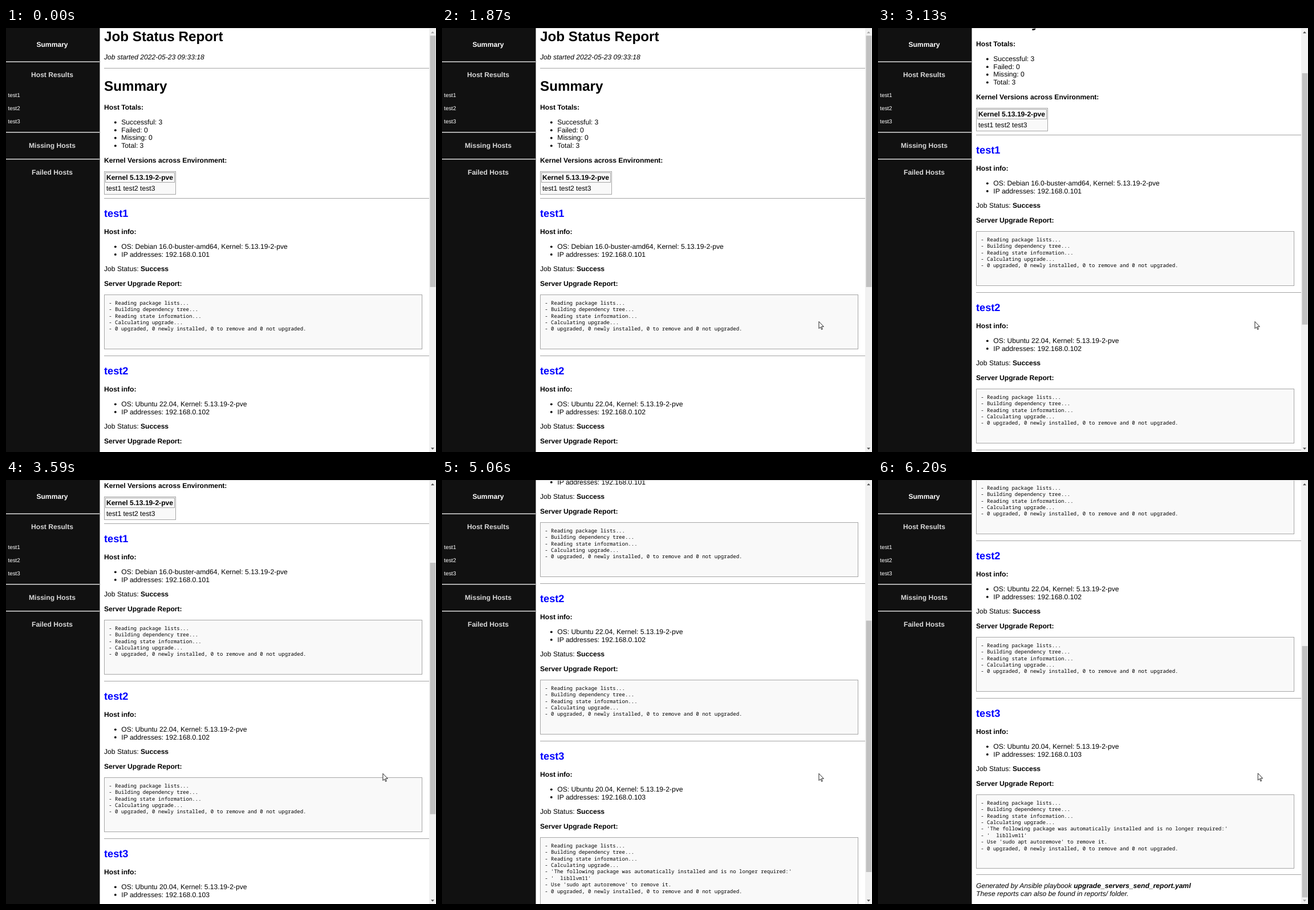
An HTML page for the animation above (8000 ms loop, 754 px wide and 743 px high).

```html
<!DOCTYPE html>
<html lang="en">
<head>
<meta charset="utf-8">
<title>Job Status Report</title>
<style>
  html, body { margin: 0; width: 100%; height: 100%; overflow: hidden; background: #fff; }
  svg { display: block; width: 100vw; height: 100vh; }
  text { font: 12.11px "Liberation Sans", Arial, sans-serif; text-rendering: geometricPrecision; white-space: pre; }
  .b { font-weight: bold; }
  .i { font-style: italic; }
  .h1 { font-size: 24.22px; font-weight: bold; }
  .h2 { font-size: 18.17px; font-weight: bold; fill: #00f; }
  .log { font: 9.02px "Noto Sans Mono", "DejaVu Sans Mono", monospace; }
  .nav { font-weight: bold; text-anchor: middle; fill: #d8d8d8; }
  .active, .link { fill: #fff; }
  .link { font-size: 9.84px; }
  .box { fill: #f9f9f9; stroke: #a6a6a6; }
</style>
</head>
<body>
<svg viewBox="0 0 754 743">
  <g id="page"></g>
  <rect x="164" width="590" height="1" fill="#d4d4d4"/>
  <g id="sidebar"></g>
  <rect x="742" y="1" width="12" height="742" fill="#f1f1f1"/>
  <rect id="thumb" x="743.5" width="9.8" height="440.5" fill="#c1c1c1"/>
  <path id="up" d="M745 9.3h6l-3-3.3z"/>
  <path id="down" d="M745 735.5h6l-3 3.3z"/>
  <path id="cursor" d="M.4.4V12.6L3.2 10 5.1 14.4 6.8 13.7 4.9 9.3H8.8Z" fill="#fff" stroke="#000" stroke-width=".85"/>
</svg>
<script>
const $ = id => document.getElementById(id);
const LEFT = 172, LINE = 13.63, PARAGRAPH = 25.8, LOG_LINE = 11.36, SECTION = 275.8;

const text = (cls, x, y, content) => `<text class="${cls}" x="${x}" y="${y}">${content}</text>`;
const rule = y => `<rect x="${LEFT}" y="${y}" width="570" height="1" fill="#a4a4a4"/>`;
const box = (x, y, w, h) => `<rect class="box" x="${x + .5}" y="${y + .5}" width="${w}" height="${h}"/>`;
const bold = content => `<tspan class="b">${content}</tspan>`;
const list = (y, items) => items.map((item, i) =>
  `<circle cx="191.8" cy="${y + i * LINE - 3.7}" r="1.9"/>` + text('', 202.3, y + i * LINE, item)).join('');

const steps = ['Reading package lists...', 'Building dependency tree...',
  'Reading state information...', 'Calculating upgrade...'];
const totals = '0 upgraded, 0 newly installed, 0 to remove and 0 not upgraded.';
const cleanup = ["'The following package was automatically installed and is no longer required:'",
  "'  libllvm11'", "Use 'sudo apt autoremove' to remove it."];
const hosts = [
  { os: 'Debian 16.0-buster-amd64', log: [...steps, totals] },
  { os: 'Ubuntu 22.04', log: [...steps, totals] },
  { os: 'Ubuntu 20.04', log: [...steps, ...cleanup, totals] },
];

function hostSection({ os, log }, i) {
  const top = Math.round(298 + SECTION * i);
  const info = top + 63.2;
  const status = info + PARAGRAPH * 2 + LINE;
  return rule(top) +
    text('h2', LEFT, top + 33, `test${i + 1}`) +
    text('b', LEFT, info, 'Host info:') +
    list(info + PARAGRAPH, [`OS: ${os}, Kernel: 5.13.19-2-pve`, `IP addresses: 192.168.0.10${i + 1}`]) +
    text('', LEFT, status, `Job Status: ${bold('Success')}`) +
    text('b', LEFT, status + PARAGRAPH, 'Server Upgrade Report:') +
    box(LEFT, top + 169, 557, Math.floor((log.length + 2) * LOG_LINE + 16)) +
    log.map((line, n) => text('log', 180.3, top + 187 + n * LOG_LINE, `- ${line}`)).join('');
}

$('page').innerHTML =
  text('h1', LEFT, 22.6, 'Job Status Report') +
  text('i', LEFT, 55.3, 'Job started 2022-05-23 09:33:18') +
  rule(70) +
  text('h1', LEFT, 110.4, 'Summary') +
  text('b', LEFT, 143.4, 'Host Totals:') +
  list(143.4 + PARAGRAPH, ['Successful: 3', 'Failed: 0', 'Missing: 0', 'Total: 3']) +
  text('b', LEFT, 235.8, 'Kernel Versions across Environment:') +
  box(LEFT, 251, 125, 40) + box(LEFT + 2, 253, 121, 17) +
  text('b', 175.9, 266.1, 'Kernel 5.13.19-2-pve') +
  text('', 175.9, 285, 'test1 test2 test3') +
  hosts.map(hostSection).join('') +
  rule(1159) +
  text('i', LEFT, 1183.2, `Generated by Ansible playbook ${bold('upgrade_servers_send_report.yaml')}`) +
  text('i', LEFT, 1183.2 + LINE, 'These reports can also be found in reports/ folder.');

const divider = y => `<rect y="${y}" width="164" height="1.5" fill="#ddd"/>`;
$('sidebar').innerHTML =
  '<rect width="164.5" height="743" fill="#111"/>' +
  text('nav active', 81, 33.4, 'Summary') + divider(58.5) +
  text('nav', 81, 86.4, 'Host Results') +
  hosts.map((host, i) => text('link', 3.5, 120.5 + 23.4 * i, `test${i + 1}`)).join('') + divider(182) +
  text('nav', 81, 209.8, 'Missing Hosts') + divider(229) +
  text('nav', 81, 256.8, 'Failed Hosts');

// Motion is sampled 15 times a second; all times below count samples.
const LOOP = 8000, SAMPLE = 1000 / 15, SAMPLE_OFFSET = 18;
const NOTCH = 111, NOTCH_TIME = 3, MAX_SCROLL = 468;
const wheelTurns = [43.3, 51.3, 65.04, 75.32, 82.16];

// Mouse moves: start, duration, dx, dy
const entry = { time: 17, x: 719, y: 737 };
const moves = [[17, 1, 21, -4], [22, 6, -79.5, -219], [83, 5, 3.5, -.5], [90, 3, 1.8, 0]];

const progress = (n, start, duration) => Math.min(1, Math.max(0, (n - start) / duration));
const easeOut = (u, power) => 1 - (1 - u) ** power;

function scrollAt(n) {
  return wheelTurns.reduce((scroll, start) => scroll +
    Math.min(NOTCH, MAX_SCROLL - scroll) * easeOut(progress(n, start, NOTCH_TIME), 3), 0);
}

function pointerAt(n) {
  let { x, y } = entry;
  for (const [start, duration, dx, dy] of moves) {
    const u = easeOut(progress(n, start, duration), 1.5);
    x += dx * u;
    y += dy * u;
  }
  return { x, y };
}

function draw(ms) {
  const n = Math.floor((ms % LOOP + SAMPLE_OFFSET) / SAMPLE);
  const scroll = Math.round(scrollAt(n));
  const { x, y } = pointerAt(n);
  $('page').setAttribute('transform', `translate(0 ${-scroll})`);
  $('thumb').setAttribute('y', 13.4 + scroll * .593);
  $('up').setAttribute('fill', scroll > 0 ? '#505050' : '#a3a3a3');
  $('down').setAttribute('fill', scroll < MAX_SCROLL ? '#505050' : '#a3a3a3');
  $('cursor').setAttribute('visibility', n < entry.time ? 'hidden' : 'visible');
  $('cursor').setAttribute('transform', `translate(${x} ${y})`);
  requestAnimationFrame(() => draw(performance.now() - start));
}
const start = performance.now();
draw(0);
</script>
</body>
</html>
```
